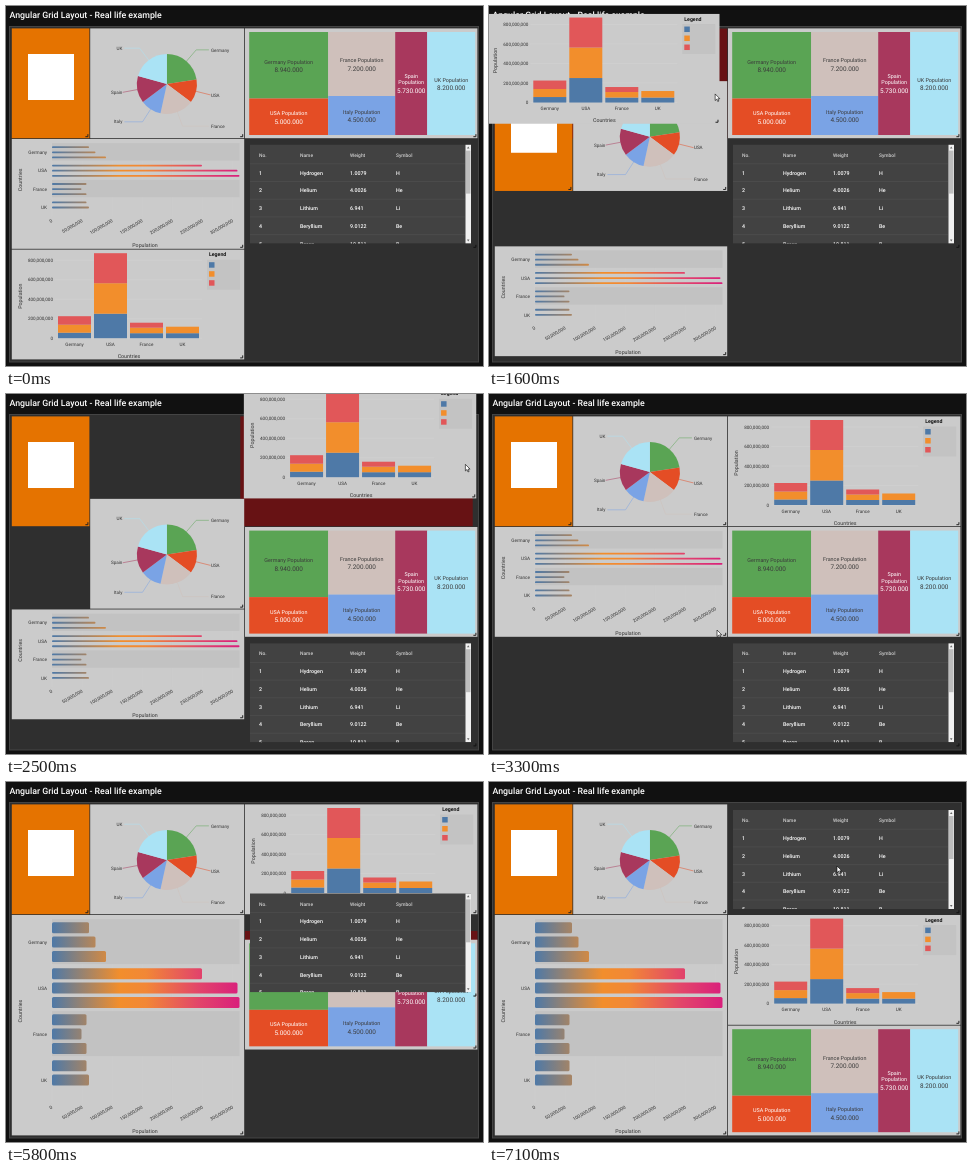
An HTML page that plays this animation: 477x360 px, repeating every 7200 ms.

```html
<!DOCTYPE html>
<html lang="en">
<head>
<meta charset="utf-8">
<title>Grid layout</title>
<style>
html, body { margin: 0; height: 100%; overflow: hidden; background: #111; }
svg { display: block; }
text { font-family: Roboto, sans-serif; text-rendering: geometricPrecision; }
</style>
</head>
<body>
<svg id="stage" width="477" height="360" viewBox="0 0 477 360"></svg>
<script>
const LOOP = 7200, ROWS = [22.4, 133, 243.6], LEFT = 5.8, RIGHT = 239, PIE_X = 84.2, COL = 38.8, W = 232.4, H = 109.8;
const stage = document.getElementById('stage');
const COUNTRIES = [
  ['Germany', 8.94, '#5aa454'], ['USA', 5, '#e44d25'], ['France', 7.2, '#cfc0bb'],
  ['Italy', 4.5, '#7aa3e5'], ['Spain', 5.73, '#a8385d'], ['UK', 8.2, '#aae3f5']
];
const STACK = ['#4e79a7', '#f28e2c', '#e15759'];

// ---- markup helpers (text is centred vertically on y) ----
const rect = (x, y, w, h, fill, more = '') =>
  `<rect x="${x}" y="${y}" width="${w}" height="${h}" fill="${fill}" ${more}/>`;
const text = (x, y, s, size = 4.7, fill = '#333', anchor = 'start', more = '') =>
  `<text x="${x}" y="${y + size * .36}" font-size="${size}" fill="${fill}" text-anchor="${anchor}" ${more}>${s}</text>`;
const turned = (x, y, angle, s, size, anchor) =>
  `<g transform="translate(${x} ${y}) rotate(${angle})">${text(0, 0, s, size, '#333', anchor)}</g>`;
const path = (d, fill, stroke = 'none', width = .5) =>
  `<path d="${d}" fill="${fill}" stroke="${stroke}" stroke-width="${width}"/>`;
const handle = (w, h, fill = '#222') =>
  `<g class="handle" transform="translate(${w} ${h})">${path('M-1.5-4V-1.5H-4', 'none', fill, 1)}</g>`;
const tile = (w, h, fill, body) =>
  rect(0, 0, w, h, fill, 'class="back"') + `<g transform="translate(.2 .6)">${body}</g>` + handle(w, h);
const millions = n => n ? n + ',000,000' : '0';

function pie() {
  const cx = 76.5, cy = 55, r = 30, total = COUNTRIES.reduce((sum, c) => sum + c[1], 0);
  const at = (a, k) => [cx + Math.sin(a) * r * k, cy - Math.cos(a) * r * k];
  let angle = 0, out = '';
  for (const [name, value, color] of COUNTRIES) {
    const end = angle + value / total * 2 * Math.PI, mid = (angle + end) / 2, right = mid < Math.PI;
    const elbow = at(mid, 1.5);
    out += path(`M${cx} ${cy}L${at(angle, 1)}A${r} ${r} 0 0 1 ${at(end, 1)}Z`, color);
    out += path(`M${at(mid, 1)}L${elbow}H${right ? Math.max(elbow[0], 118.5) : Math.min(elbow[0], 34)}`, 'none', color);
    out += text(right ? 120.5 : 32, elbow[1], name, 4.6, '#333', right ? 'start' : 'end');
    angle = end;
  }
  return out;
}

function groupedBars(pitch, height) {
  const x0 = 40, y0 = 3.5, bottom = y0 + pitch * 4, bar = (pitch - 13) / 3;
  const groups = [['Germany', 37, 43.5, 54], ['USA', 150, 185.5, 187.5], ['France', 34.5, 29.5, 34.5], ['UK', 34.5, 37]];
  let out = '';
  for (let i = 0; i < 7; i++) {
    const x = x0 + i * 30.1;
    out += path(`M${x} ${y0}V${bottom}`, 'none', '#cfcfcf', .4);
    out += turned(x, bottom + 3.5, -30, millions(i * 50), 4.7, 'end');
  }
  groups.forEach(([name, ...widths], g) => {
    const top = y0 + g * pitch;
    if (g % 2 == 0) out += rect(x0, top, 187.5, pitch - 1, '#c2c2c2');
    out += text(35, top + pitch / 2, name, 4.7, '#333', 'end');
    widths.forEach((w, i) => out += rect(x0, top + 3.2 + i * (bar + 3.3), w, bar, 'url(#heat)', `rx="${Math.min(1.5, bar / 2)}"`));
  });
  return out + turned(8, y0 + pitch * 2, -90, 'Countries', 5.3, 'middle') +
    text(133, height - 4.8, 'Population', 5.3, '#333', 'middle');
}

function stackedBars() {
  const base = 88, bars = [['Germany', 5.5, 8, 8.5], ['USA', 24.5, 30.5, 30], ['France', 5, 5.5, 5], ['UK', 5, 6.5]];
  let out = '';
  for (let i = 0; i < 5; i++) {
    const y = base - i * 19.5;
    out += path(`M43 ${y}H190`, 'none', '#d3d3d3', .4) + text(41, y, millions(i * 200), 4.6, '#333', 'end');
  }
  bars.forEach(([name, ...parts], i) => {
    const x = 46 + i * 36;
    let y = base;
    parts.forEach((h, k) => out += rect(x, y -= h, 33, h, STACK[k]));
    out += text(x + 16.5, 94, name, 4.6, '#333', 'middle');
  });
  out += turned(8, 46, -90, 'Population', 5.3, 'middle') + text(117, 106, 'Countries', 5.3, '#333', 'middle');
  out += text(197, 4.4, 'Legend', 5.2, '#111', 'start', 'font-weight="700"') + rect(195, 9.5, 33, 30, '#c3c3c3');
  STACK.forEach((c, i) => out += rect(197, 12 + i * 9, 5.5, 5.5, c));
  return out;
}

function treemap() {
  const cells = [[4, 3, 79, 66.5], [4, 69.5, 79, 36.5], [83, 3, 67, 64], [83, 67, 67, 39], [150, 3, 32, 103], [182, 3, 48, 103]];
  return COUNTRIES.map(([name, value, color], i) => {
    const [x, y, w, h] = cells[i], cx = x + w / 2, cy = y + h / 2 + .4;
    const ink = i == 1 || i == 4 ? '#fff' : '#3a3a3a';
    const line = (dy, s, size) => text(cx, cy + dy, s, size, ink, 'middle');
    const label = i == 4 ? line(-8, name, 5.4) + line(-1.7, 'Population', 5.4) : line(-4, name + ' Population', 5.4);
    return rect(x, y, w, h, color) + label + line(i == 4 ? 6.3 : 4.2, value.toFixed(2) + '0.000', 6.4);
  }).join('');
}

function table() {
  const columns = [9, 50, 100, 146];
  const rows = [['No.', 'Name', 'Weight', 'Symbol'], [1, 'Hydrogen', '1.0079', 'H'], [2, 'Helium', '4.0026', 'He'],
    [3, 'Lithium', '6.941', 'Li'], [4, 'Beryllium', '9.0122', 'Be'], [5, 'Boron', '10.811', 'B']];
  let out = rect(0, 0, 221, 99, '#424242');
  rows.forEach((row, i) => {
    const y = 10.5 + i * 17.7;
    row.forEach((s, k) => out += text(columns[k], y, s, i ? 5.3 : 4.9, i ? '#fff' : '#d0d0d0', 'start', 'font-weight="500"'));
    out += path(`M0 ${y + 8.7}H215`, 'none', '#5a5a5a', .4);
  });
  out += rect(215.5, 0, 5.5, 99, '#f0f0f0') + rect(216, 6, 4.5, 43, '#bdbdbd') +
    path('M217 4L218.2 2L219.5 4ZM217 95L218.2 97L219.5 95Z', '#666');
  return `<svg x="5" y="5.6" width="221" height="99">${out}</svg>` + handle(W, H, '#111');
}

const group = (id, body) => `<g id="${id}">${body}</g>`;
stage.innerHTML = `<defs><linearGradient id="heat" gradientUnits="userSpaceOnUse" x1="40" x2="228">
  <stop offset="0" stop-color="#4e79a7"/><stop offset=".36" stop-color="#f28e2c"/><stop offset=".5" stop-color="#f28736"/>
  <stop offset=".78" stop-color="#e2456a"/><stop offset="1" stop-color="#d91f7c"/></linearGradient></defs>` +
  rect(0, 0, 477, 360, '#111') +
  text(3.5, 8.7, 'Angular Grid Layout - Real life example', 8.8, '#fff', 'start', 'font-weight="500"') +
  rect(3.5, 20.5, 469, 335.5, '#2f2f2f', 'stroke="#444"') +
  rect(0, 0, W, H, '#671214', 'id="slot"') +
  group('logo', tile(77.6, H, '#e57300', rect(16, 25, 46, 46, '#fff'))) +
  group('pie', tile(154, H, '#cbcbcb', pie())) +
  group('tree', tile(W, H, '#cbcbcb', treemap())) +
  group('bars', tile(W, H, '#cbcbcb', group('low', groupedBars(18.4, H)) + group('tall', groupedBars(46, 220.4)))) +
  group('stack', tile(W, H, '#cbcbcb', stackedBars())) +
  group('table', table()) +
  group('cursor', path('M0 0V6.6L1.6 5.2L2.6 7.6L3.7 7.1L2.7 4.8H4.7Z', '#fff', '#000', .6));

// ---- motion ----
const clamp = v => Math.min(1, Math.max(0, v));
const linear = p => p;
function ease(p) { // cubic-bezier(.25, .1, .25, 1)
  let lo = 0, hi = 1, s = .5;
  for (let i = 0; i < 20; i++) {
    s = (lo + hi) / 2;
    if (.75 * s * (1 - s) + s ** 3 < p) lo = s; else hi = s;
  }
  return .3 * s * (1 - s) ** 2 + 3 * s * s * (1 - s) + s ** 3;
}

// A track is a start value followed by steps [start, duration, value, curve].
const follow = ([start, ...steps], t) => steps.reduce((v, [t0, span, to, curve = ease]) => {
  const p = curve(clamp((t - t0) / span));
  return v.map((a, i) => a + (to[i] - a) * p);
}, start);
const drag = points => points.slice(1).map(([t, ...to], i) => [points[i][0], t - points[i][0], to, linear]);
const shift = (t, x, row) => [t, 500, [x, ROWS[row]]];
const snap = (t, x, row) => [t, 150, [x, ROWS[row]]];

const tracks = {
  logo: [[LEFT, ROWS[0]], shift(1460, LEFT, 1), shift(2005, LEFT, 0)],
  pie: [[PIE_X, ROWS[0]], shift(1460, PIE_X, 1), shift(2410, PIE_X, 0)],
  bars: [[LEFT, ROWS[1]], shift(1210, LEFT, 2), shift(2410, LEFT, 1)],
  tree: [[RIGHT, ROWS[0]], shift(1886, RIGHT, 1), shift(5717, RIGHT, 2)],
  stack: [[LEFT, ROWS[2]],
    ...drag([[500, LEFT, ROWS[2]], [1100, -5, 196.5], [1500, -4, 24], [1600, -2, 8], [1880, 25, -10],
      [2000, 65, -13.3], [2450, 235, -6], [2700, 249, -3]]),
    [2750, 300, [RIGHT, ROWS[0]]], shift(6050, RIGHT, 1)],
  table: [[RIGHT, ROWS[1]], shift(1886, RIGHT, 2),
    ...drag([[5450, RIGHT, ROWS[2]], [5650, RIGHT, 180], [5800, RIGHT, 106], [6050, RIGHT, 40], [6300, RIGHT, 22]]),
    [6500, 200, [RIGHT, ROWS[0]]]],
  cursor: [[230, 362], ...drag([[0, 230, 362], [400, 228, 318], [500, 228, 318], [1100, 217, 268], [1500, 222, 105],
    [1600, 226, 88], [1880, 270, 72], [2000, 320, 74.5], [2450, 457, 70], [2750, 471, 72], [3300, 228, 236],
    [3600, 236, 241], [4600, 241, 341], [4800, 240, 351], [5300, 349, 307], [5450, 349, 307], [6300, 348, 84]])]
};
const slot = [[LEFT, ROWS[2]], snap(1210, LEFT, 1), snap(1460, LEFT, 0),
  ...[1880, 2004, 2104, 2207, 2310, 2410].map((t, i) => snap(t, LEFT + COL * (i + 1), 0)),
  [2750, 1, [LEFT, ROWS[1]]], [5000, 1, [RIGHT, ROWS[2]]], snap(5717, RIGHT, 1), snap(6050, RIGHT, 0)];
const barsSize = [[W, H], ...drag([[3600, W, H], [4600, 237, 209], [4800, 236, 218.5]]), [4850, 150, [W, 220.4]]];

const el = id => document.getElementById(id);
const set = (node, attrs) => { for (const k in attrs) node.setAttribute(k, attrs[k]); };
const show = (id, on) => el(id).setAttribute('visibility', on ? 'visible' : 'hidden');
const within = (t, a, b) => t >= a && t < b;

function draw(now) {
  const t = now % LOOP;
  for (const id in tracks) set(el(id), { transform: `translate(${follow(tracks[id], t)})` });

  const [w, h] = follow(barsSize, t);
  set(el('bars').querySelector('.back'), { width: w, height: h });
  set(el('bars').querySelector('.handle'), { transform: `translate(${w} ${h})` });
  show('low', t < 4900);
  show('tall', t >= 4900);

  const moving = within(t, 500, 2750), sizing = within(t, 3600, 4850), raising = within(t, 5450, 6500);
  const [x, y] = follow(slot, t);
  set(el('slot'), { x, y, height: sizing ? Math.round(h / 18.4) * 18.4 - 1.4 : H });
  show('slot', moving || sizing || raising);
  show('cursor', !raising);
  requestAnimationFrame(draw);
}
requestAnimationFrame(draw);
</script>
</body>
</html>
```
